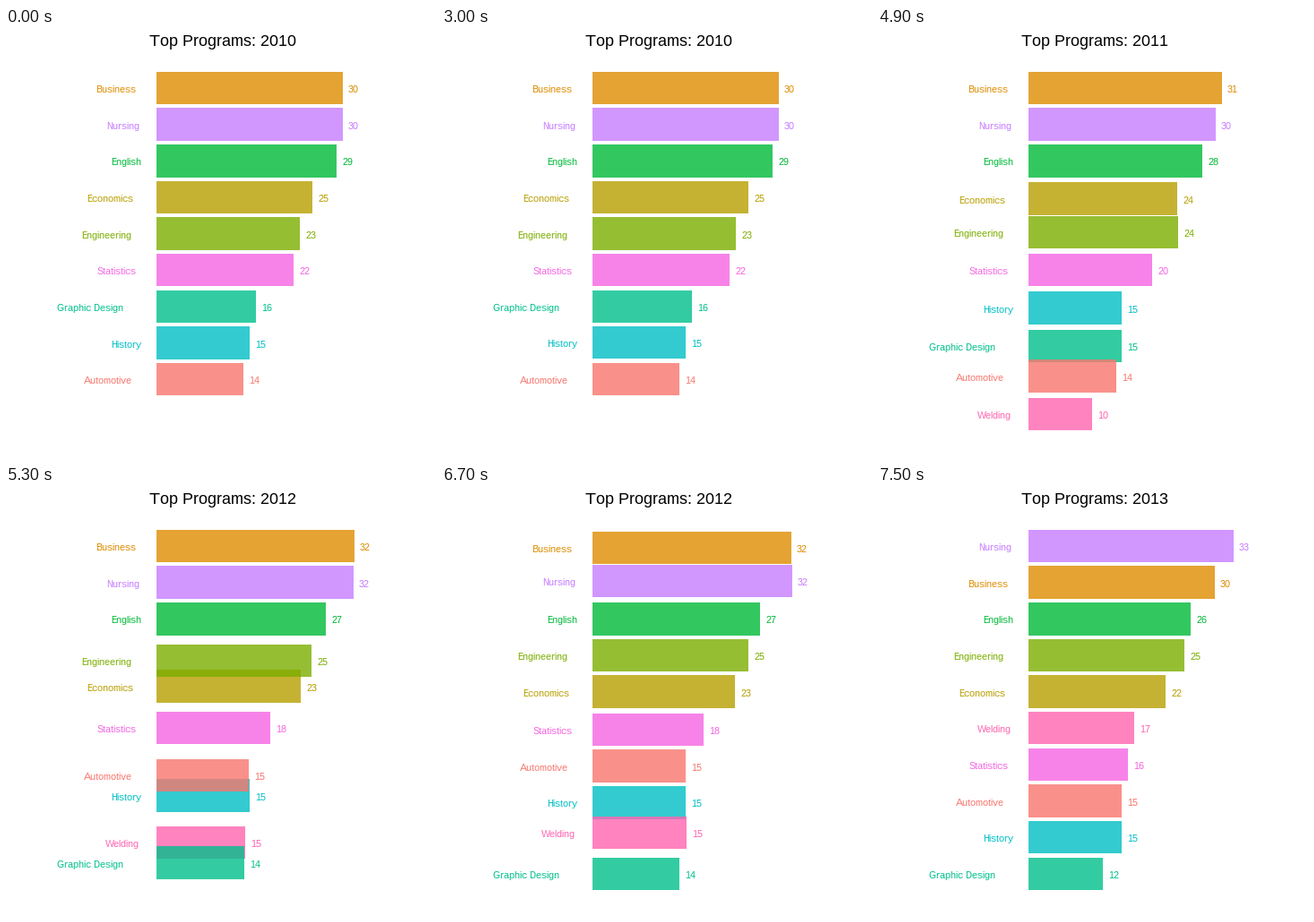
Write a matplotlib script that moves like this. It is 480 px wide and 480 px high and loops after 8000 ms.

```python
import matplotlib.pyplot as plt
from matplotlib.animation import FuncAnimation
from matplotlib.patches import Rectangle

SIZE, DPI = 480, 100
FRAMES, INTERVAL = 80, 100
STEPS = 9                    # frames per transition
STARTS = (29, 47, 65)        # last still frame before each transition

LEFT, UNIT = 168, 6.945      # bar start and pixels per unit
TOP, PITCH, HEIGHT = 48.75, 40.64, 36.49

# name: (colour, label centre x), listed from back to front
PROGRAMS = {
    "Business": ("#DE8C00", 122.5),
    "Nursing": ("#C77CFF", 130.5),
    "English": ("#00BA38", 134),
    "Economics": ("#B79F00", 116),
    "Engineering": ("#7CAE00", 112),
    "Statistics": ("#F564E3", 124),
    "History": ("#00BFC4", 134),
    "Welding": ("#FF64B0", 130),
    "Graphic Design": ("#00C08B", 94),
    "Automotive": ("#F8766D", 114),
}

# each year's ranking, best first
YEARS = [
    {"Business": 30, "Nursing": 30, "English": 29, "Economics": 25,
     "Engineering": 23, "Statistics": 22, "Graphic Design": 16,
     "History": 15, "Automotive": 14},
    {"Business": 31, "Nursing": 30, "English": 28, "Economics": 24,
     "Engineering": 24, "Statistics": 20, "History": 15,
     "Graphic Design": 15, "Automotive": 14, "Welding": 10},
    {"Business": 32, "Nursing": 32, "English": 27, "Engineering": 25,
     "Economics": 23, "Statistics": 18, "Automotive": 15,
     "History": 15, "Welding": 15, "Graphic Design": 14},
    {"Nursing": 33, "Business": 30, "English": 26, "Engineering": 25,
     "Economics": 22, "Welding": 17, "Statistics": 16,
     "Automotive": 15, "History": 15, "Graphic Design": 12},
]
RANKS = [{name: i for i, name in enumerate(year)} for year in YEARS]

# whole-pixel hinting and no kerning, for crisp small text
plt.rcParams.update({
    "font.family": "Liberation Sans",
    "text.hinting": "native",
    "text.hinting_factor": 1,
    "text.kerning_factor": 6,
})
fig = plt.figure(figsize=(SIZE / DPI, SIZE / DPI), dpi=DPI, facecolor="white")
ax = fig.add_axes([0, 0, 1, 1])
ax.set_xlim(0, SIZE)
ax.set_ylim(SIZE, 0)
ax.axis("off")


def put_text(x, y, text, px, color, ha="left"):
    return ax.text(x, y, text, fontsize=px * 72 / DPI, color=color,
                   ha=ha, va="baseline", zorder=3)


def ease(t):
    return 4 * t ** 3 if t < 0.5 else 1 - 4 * (1 - t) ** 3


def mix(a, b, t):
    return a + (b - a) * t


def phase(frame):
    """Return the year being left and the linear progress to the next."""
    for i, start in reversed(list(enumerate(STARTS))):
        if frame > start:
            return i, min((frame - start) / STEPS, 1)
    return 0, 0


title = put_text(160, 20, "", 18, "black")
rows = {}
for name, (color, x) in PROGRAMS.items():
    bar = Rectangle((LEFT, 0), 0, 0, facecolor=color, alpha=0.8,
                    linewidth=0, antialiased=False, zorder=2)
    ax.add_patch(bar)
    rows[name] = (bar, put_text(x, 0, name, 11, color, ha="center"),
                  put_text(0, 0, "", 11, color))


def draw(frame):
    i, t = phase(frame)
    e = ease(t)
    near = i + (t > 0.5)
    title.set_text(f"Top Programs: {2010 + near}")

    for name, (bar, label, number) in rows.items():
        old = i if name in YEARS[i] else i + 1
        shown = old == i or t == 1
        for part in (bar, label, number):
            part.set_visible(shown)
        if not shown:
            continue

        value = mix(YEARS[old][name], YEARS[i + 1][name], e)
        top = TOP + PITCH * mix(RANKS[old][name], RANKS[i + 1][name], e)
        end = round(LEFT + UNIT * value)
        y0, y1 = round(top), round(top + HEIGHT)
        bar.set_bounds(LEFT, y0, end - LEFT, y1 - y0)

        base = round(top + HEIGHT / 2 + 5.2)
        label.set_y(base)
        number.set_position((end + 6, base))
        number.set_text(str(YEARS[max(near, old)][name]))
    return [title, *(part for row in rows.values() for part in row)]


anim = FuncAnimation(fig, draw, frames=FRAMES, interval=INTERVAL,
                     init_func=lambda: draw(0), repeat=True, repeat_delay=0)
plt.show()
```
